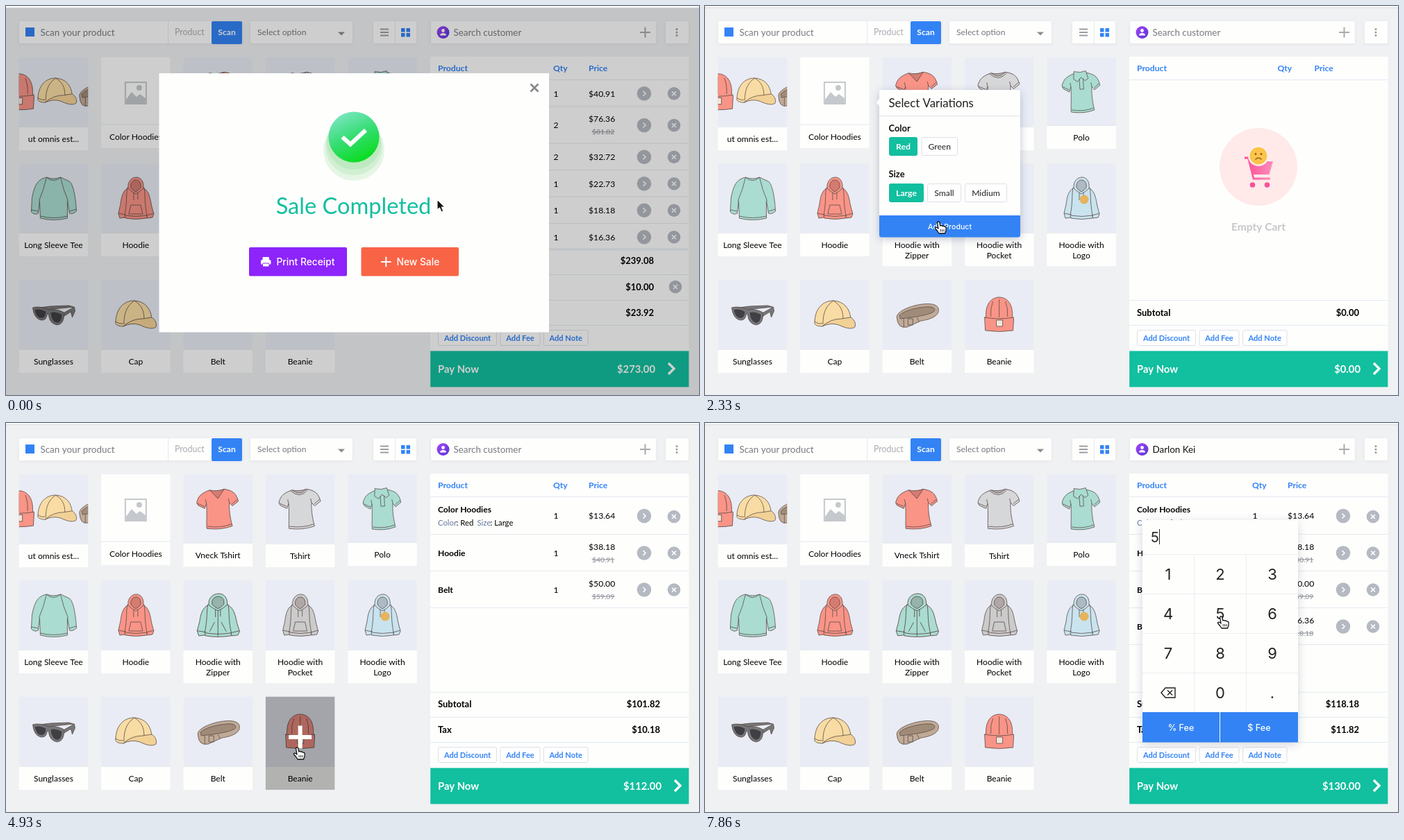
An HTML page with a canvas that plays this animation: 998 px wide and 561 px high, repeating every 8000 ms.

```html
<!DOCTYPE html>
<html lang="en">
<head>
<meta charset="utf-8">
<title>Point of sale</title>
<style>
html, body { margin: 0; width: 100%; height: 100%; overflow: hidden; background: #f0f1f3; }
canvas { display: block; width: 998px; height: 561px; }
</style>
</head>
<body>
<canvas id="stage" width="998" height="561"></canvas>
<script>
const c = document.getElementById('stage').getContext('2d');
const LOOP = 8000;
const BLUE = '#3383f5', GREEN = '#12bf9f', INK = '#5a4c48', LINE = '#e4e8ee', WHITE = '#fefefd';
const CORAL = '#f99487', TEAL = '#aadcd1', GREY = '#d6d7d9', SKY = '#c9e3ef', SHADE = 'rgba(80,40,40,.22)';
const HOST = '3ab8d1c6.zov.test', CUSTOMER = 'Darlon Kei';

// drawing helpers
function box(x, y, w, h, fill, r = 0, stroke) {
  c.beginPath();
  c.roundRect(x, y, w, h, r);
  if (fill) { c.fillStyle = fill; c.fill(); }
  if (stroke) { c.strokeStyle = stroke; c.lineWidth = 1; c.stroke(); }
}
function disc(x, y, r, fill) {
  c.beginPath();
  c.arc(x, y, r, 0, 7);
  c.fillStyle = fill;
  c.fill();
}
function path(d, fill, stroke, width = 1) {
  const p = new Path2D(d);
  if (fill) { c.fillStyle = fill; c.fill(p); }
  if (stroke) { c.strokeStyle = stroke; c.lineWidth = width; c.stroke(p); }
}
function text(s, x, y, size, color = '#000', weight = 400, align = 'left', font = 'Lato') {
  c.font = `${weight} ${size}px ${font}, sans-serif`;
  c.textAlign = align;
  c.fillStyle = color;
  c.fillText(s, x, y + size * .35);
}
function at(x, y, draw, sx = 1, sy = sx, angle = 0) {
  c.save();
  c.translate(x, y);
  c.rotate(angle);
  c.scale(sx, sy);
  draw();
  c.restore();
}
function shadow(blur, color, draw) {
  c.save();
  c.shadowBlur = blur;
  c.shadowColor = color;
  c.shadowOffsetY = blur / 4;
  draw();
  c.restore();
}
const ramp = (t, a, b) => Math.min(1, Math.max(0, (t - a) / (b - a)));
const inside = ([px, py], x, y, w, h) => px >= x && px <= x + w && py >= y && py <= y + h;
const money = v => '$' + v.toFixed(2);
const ink = (d, fill) => path(d, fill, INK, .8);

// product pictures, drawn around their centre
function tee(color, neck) {
  ink('M-10 -28Q0 -25 11 -28L8 -21L1 -15L-7 -21Z', color);
  path('M-10 -28Q0 -25 11 -28L8 -21L1 -15L-7 -21Z', SHADE);
  ink(`M-10 -28C-20 -25 -27 -22 -30 -11L-28 -7L-19 -2L-16 -9C-16 5 -18 18 -18 27Q2 31 19 26
    C16 12 16 0 17 -8L21 -3L30 -9C28 -20 24 -25 11 -28${neck}Z`, color);
  ink('M-16 -9L-17 -15M17 -8L16 -14M-29 -10L-19 -5M21 -6L29 -12M-17 24Q2 28 18 23');
}
const tilted = draw => at(0, 0, draw, 1, 1, -.07);
const vneck = () => tilted(() => tee(CORAL, 'L1 -15L-10 -28'));
const tshirt = () => tilted(() => { tee(GREY, 'Q1 -18 -10 -28'); ink('M-12 -27Q1 -14 13 -27'); });
function polo() {
  at(0, 1, () => {
    tee(TEAL, 'L0 -22');
    ink('M-10 -31L-11 -20L-5 -16L1 -22L7 -17L12 -20L9 -31Q0 -28 -10 -31Z', TEAL);
    ink('M-2 -20V-5H4V-20');
  }, .91, 1, -.06);
}
function longTee() {
  ink(`M-10 -30C-22 -27 -27 -21 -31 0L-32 20Q-27 25 -22 22L-20 4L-19 29Q0 34 20 29L20 4
    L23 22Q27 24 33 19C32 0 29 -19 23 -24L10 -30Q0 -26 -10 -30Z`, TEAL);
  ink('M-10 -30Q-14 -12 -21 4M10 -30Q14 -12 21 4M-32 17L-22 19M23 19L33 16M-19 26Q0 31 20 26M-9 -29Q0 -22 9 -29');
}
function hoodie(color) {
  ink('M-12 -14C-19 -10 -21 0 -22 9L-25 22L-23 29L-15 28L-13 21L-10 2Z', color);
  ink('M12 -14C20 -9 21 2 23 12L26 23L24 28L17 29L14 22L10 2Z', color);
  ink('M-12 -15C-14 -8 -12 4 -16 25L-15 29Q0 32 16 29L16 25C12 4 14 -8 12 -15Q0 -6 -12 -15Z', color);
  ink('M-11 -14C-12 -24 -6 -30 1 -30C8 -30 12 -23 11 -14Q6 -9 0 -6Q-6 -9 -11 -14Z', color);
  ink('M-7 -15C-8 -22 -4 -26 0 -26C5 -26 8 -22 7 -15Q4 -11 0 -9Q-4 -11 -7 -15Z', SHADE);
  ink('M-25 22L-14 24M15 25L26 22M-15 25Q0 28 16 25M-3 -8V3M3 -8V2');
}
const pocket = () => ink('M-10 23L-7 10H7L10 23Z');
const redHoodie = () => { hoodie(CORAL); pocket(); };
const greyHoodie = () => { hoodie('#cccbcb'); pocket(); };
const zipHoodie = () => at(0, 0, () => { hoodie(TEAL); ink('M0 -7V30M-10 23L-4 10M10 23L4 10'); }, 1.2, 1.03);
const badgeHoodie = () => { hoodie(SKY); disc(4, 2, 6.5, '#e5b45c'); };
function glasses() {
  ink('M-29 -9L-4 -12L22 -13L29 -11L-9 -7Z', '#77777a');
  ink('M14 -2L30 -11L31 -5L27 4L25 -4L14 3Z', '#77777a');
  ink('M-30 -10Q-20 -13 -7 -7Q4 -9 15 -3Q16 14 5 15Q-6 13 -7 0L-9 -1Q-10 9 -18 8Q-28 6 -30 -10Z', '#77777a');
  path('M-27 -7Q-18 -9 -11 -4Q-12 6 -18 5Q-25 4 -27 -7ZM-4 -3Q4 -5 12 0Q12 11 5 12Q-3 10 -4 -3Z', '#3f3f44');
}
function cap() {
  ink('M-29 13C-29 -8 -18 -20 -2 -20C14 -19 22 -8 23 6L10 8Q-8 8 -18 17Q-27 17 -29 13Z', '#f9dca4');
  ink('M-18 17Q-6 6 10 6L23 4C28 7 31 13 29 18C24 22 14 19 6 15Q-6 11 -18 17Z', '#f2d196');
  ink('M-2 -20C-14 -12 -17 0 -17 14M-2 -20C8 -14 12 -6 12 6M-29 10Q-24 14 -18 13');
}
function belt() {
  ink('M-29 4C-30 -4 -10 -13 8 -15C24 -17 32 -13 31 -6C31 2 20 7 6 9L-14 18Q-28 21 -29 4Z', '#c0aa96');
  ink('M-25 1C-18 -6 0 -10 12 -11C24 -12 28 -8 24 -4C14 2 -8 4 -24 6Z', '#a08b79');
  ink('M-19 6V18M-13 6H-6V15H-13ZM0 4L3 10');
}
function beanie() {
  ink('M-19 3C-20 -18 -9 -25 0 -25C11 -25 20 -16 19 3L21 5L20 23Q0 26 -20 23L-21 4Z', CORAL);
  ink('M-21 4Q0 8 21 4M-9 -19Q-13 -9 -12 3M0 -22V4M9 -19Q13 -9 12 3');
  ink('M-4 8H5V17H-4Z', '#f1e6dc');
}
function group() {
  at(-50, 0, beanie, 1.05);
  at(5, -1, cap, .95);
  at(62, 2, belt, .85, 1);
}
function noImage() {
  c.strokeStyle = '#c5c8cc';
  c.lineWidth = 2;
  c.strokeRect(-15, -14, 30, 31);
  disc(5, -6, 4, '#c5c8cc');
  path('M-14 11L-6 0L1 7L6 3L14 9V16H-14Z', '#c5c8cc');
}

const products = [
  ['ut omnis est...', group], ['Color Hoodies', noImage], ['Vneck Tshirt', vneck], ['Tshirt', tshirt],
  ['Polo', polo], ['Long Sleeve Tee', longTee], ['Hoodie', redHoodie], ['Hoodie with|Zipper', zipHoodie],
  ['Hoodie with|Pocket', greyHoodie], ['Hoodie with|Logo', badgeHoodie], ['Sunglasses', glasses],
  ['Cap', cap], ['Belt', belt], ['Beanie', beanie]
];
const TILE = 99.5;
const firstLabels = [175, 172, 174, 175, 173];
const tiles = products.map(([name, art], i) => {
  const row = Math.floor(i / 5), col = i % 5, lines = name.split('|');
  const y = [73.7, 226.7, 394.7][row], label = row ? [0, 328, 496][row] : firstLabels[col];
  return { lines, art, label, x: 18.7 + col * 118.4, y, h: label - y + (lines.length > 1 ? 47 : 33) };
});

function drawTile(tile, hover) {
  const { x, y, h, label, lines, art } = tile, mid = x + TILE / 2;
  c.save();
  c.beginPath();
  c.rect(x, y, TILE, 100);
  c.clip();
  box(x, y, TILE, 99, art === noImage ? WHITE : '#e9ecf5');
  at(mid, y + 50.3, art);
  c.restore();
  box(x, label - 1.5, TILE, 1, LINE);
  box(x, label, TILE, y + h - label, WHITE);
  lines.forEach((s, i) => text(s, mid, label + 17 + i * 14.5, 12.05, '#000', 400, 'center'));
  if (hover) {
    box(x, y, TILE, h, 'rgba(0,0,0,.3)');
    box(mid - 16.5, y + 55.3, 33, 6, WHITE);
    box(mid - 3, y + 41.8, 6, 33, WHITE);
  }
}

function drawTop(t) {
  box(0, 0, 998, 2, '#fff');
  box(0, 2, 998, 1, '#d8d9db');
  shadow(4, 'rgba(60,70,100,.08)', () => {
    for (const [x, w] of [[19, 321], [352, 147], [529, 62], [612, 324], [950, 33]]) box(x, 22, w, 32, WHITE, 2);
  });
  box(28, 31, 13, 13, BLUE);
  text('Scan your product', 49.5, 38, 13.4, '#77797e');
  box(233, 22, 1, 32, LINE);
  text('Product', 243, 38, 12.4, '#a9abaf');
  box(296, 22, 44, 33, BLUE, 2);
  text('Scan', 318, 38, 12.1, '#fff', 700, 'center');
  text('Select option', 362, 37.5, 12.2, '#77797e');
  path('M478 37.5H488L483 42.5Z', '#8b8d92');
  box(560, 22, 1, 32, LINE);
  for (const y of [32.5, 37, 41.5]) box(539, y, 12, 2, '#9a9ca1');
  for (const x of [569, 576.5]) for (const y of [32, 39]) box(x, y, 5.5, 5.5, BLUE);

  const g = c.createLinearGradient(622, 30, 638, 46);
  g.addColorStop(0, '#a044f5');
  g.addColorStop(1, '#5a35d8');
  disc(629.5, 38, 9, g);
  disc(629.5, 35.5, 2.4, '#fff');
  path('M625 42.5Q625 39 629.5 39Q634 39 634 42.5Z', '#fff');
  const chosen = t >= 6060;
  text(chosen ? CUSTOMER : 'Search customer', 644.5, 38, 13.4, chosen ? '#111' : '#77797e');
  box(913, 37, 15, 2, '#a9abaf');
  box(919.5, 30.5, 2, 15, '#a9abaf');
  for (const y of [33.5, 38, 42.5]) disc(966, y, 1.5, '#9a9ca1');
}

// cart
const cart = [
  { time: 2400, name: 'Color Hoodies', price: 13.64, meta: true },
  { time: 3330, name: 'Hoodie', price: 38.18, old: 40.91 },
  { time: 4060, name: 'Belt', price: 50, old: 59.09 },
  { time: 5000, name: 'Beanie', price: 16.36, old: 18.18 }
];
const lastCart = [
  { price: 40.91 }, { price: 76.36, old: 81.82, qty: 2 }, { price: 32.72, qty: 2 },
  { price: 22.73 }, { price: 18.18 }, { price: 16.36 }
];

function remove(x, y) {
  disc(x, y, 9.3, '#b5b9c1');
  path(`M${x - 3} ${y - 3}l6 6m0 -6l-6 6`, null, '#fff', 1.6);
}
function drawRow({ name, price, old, meta, qty = 1 }, y, h) {
  const mid = y + h / 2;
  if (name) text(name, 622, meta ? mid - 9 : mid + .3, 12.1, '#000', 700);
  if (meta) {
    text('Color', 622, mid + 10, 11.3, '#68799b');
    text(': Red', 648.5, mid + 10, 11.3);
    text('Size', 678.5, mid + 10, 11.3, '#68799b');
    text(': Large', 697.5, mid + 10, 11.3);
  }
  text(qty, 788.5, mid, 12.2);
  text(money(price), 839, old ? mid - 9 : mid, 12.2);
  if (old) {
    text(money(old), 844, mid + 9.5, 10.3, '#8d9096');
    box(843.5, mid + 9, 33, 1, '#8d9096');
  }
  disc(919, mid, 10.3, '#b5b9c1');
  path(`M917.5 ${mid - 3.5}l3.5 3.5l-3.5 3.5`, null, '#fff', 1.6);
  remove(962, mid + (meta ? 1 : 0));
  box(611, y + h - 1, 372, 1, LINE);
}
function drawTotal(label, value, y, right) {
  box(611, y, 372, 1, '#e1ebf0');
  text(label, 622, y + 18, 13, '#000', 700);
  text(money(value), right, y + 18, 13, '#000', 700, 'right');
}
function drawEmpty() {
  disc(797, 232, 56, '#ffe9e9');
  const g = c.createLinearGradient(777, 0, 818, 0);
  g.addColorStop(0, '#fb4d92');
  g.addColorStop(1, '#fd8fbc');
  path('M777 219H782.5L790 249H814', null, g, 2.8);
  path('M785 224H818L812.5 243H789.5Z', g);
  disc(788.5, 258, 3.8, '#f8519a');
  disc(809.5, 258, 3.8, '#f8519a');
  disc(797, 216, 15, '#fff1ee');
  disc(797, 216, 12.5, '#fdc34b');
  disc(793, 213.5, 1.4, '#8a5a22');
  disc(801, 213.5, 1.4, '#8a5a22');
  path('M792.5 221.5Q797 216.5 801.5 221.5', null, '#8a5a22', 1.3);
  text('Empty Cart', 797, 318.5, 15.5, '#c6c8cb', 700, 'center');
}
function drawCart(t) {
  const before = t < 400;
  const items = before ? lastCart : cart.filter(i => t >= i.time);
  const empty = !items.length;
  box(611, 73, 372.5, 425, WHITE, 2);
  text('Product', 622, 90, 12.2, BLUE, 700);
  text('Qty', empty ? 824.5 : 788, 90, 12.2, BLUE, 700);
  text('Price', empty ? 877.5 : 839, 90, 12.2, BLUE, 700);
  box(611, 106, 372, 1, LINE);
  let y = 107, total = 0;
  for (const item of items) {
    const h = item.meta ? 54 : item.old ? 53 : 38.5;
    drawRow(item, y, h);
    y += h;
    total += item.price;
  }
  if (before) {
    total = 239.08;
    drawTotal('Subtotal', total, 349.5, 933);
    drawTotal('Fee', 10, 387, 933);
    remove(964, 405);
    drawTotal('Tax', 23.92, 424, 933);
    total = 273;
  } else if (empty) {
    drawEmpty();
    drawTotal('Subtotal', 0, 424, 942);
  } else {
    drawTotal('Subtotal', total, 387.8, 942);
    drawTotal('Tax', total / 10, 424, 942);
    total *= 1.1;
  }
  box(611, 460, 372, 1, '#e1ebf0');
  for (const [s, x, w] of [['Add Discount', 622, 84], ['Add Fee', 711.5, 57], ['Add Note', 774, 63.5]]) {
    box(x + .5, 467.5, w, 22, '#fff', 2, '#dde0e6');
    text(s, x + w / 2 + .5, 479, 11.1, BLUE, 700, 'center');
  }
  box(611.2, 497.6, 372.2, 51.8, GREEN);
  const right = before ? 935 : 944;
  text('Pay Now', 622, 523.5, 14.8, '#fff', 700);
  text(money(total), right, 523.5, 14.8, '#fff', 700, 'right');
  path(`M${right + 19} 515l8 8l-8 8`, null, '#fff', 3.4);
}

// overlays
function drawSale() {
  box(0, 3, 998, 558, 'rgba(0,0,0,.19)');
  box(220.5, 97, 561.5, 373.5, WHITE);
  path('M755.5 112.5l11 11m0 -11l-11 11', null, '#85878a', 2.6);
  for (const [y, r] of [[208, 44], [203, 41], [197, 39]]) disc(501, y, r, 'rgba(70,190,80,.13)');
  const g = c.createLinearGradient(480, 153, 515, 226);
  g.addColorStop(0, '#7fe6c6');
  g.addColorStop(.5, '#35dd72');
  g.addColorStop(1, '#06dd17');
  disc(501, 189, 36.5, g);
  path('M484.5 189L496 199.5L518 179', null, '#fff', 6);
  text('Sale Completed', 500.5, 289, 32.6, GREEN, 400, 'center');
  box(350, 348, 141, 41.5, '#8d24fa', 2);
  box(511.5, 348, 140.5, 41.5, '#f96446', 2);
  text('Print Receipt', 389.5, 369, 13.8, '#fff', 500, 'left', 'Inter');
  text('New Sale', 562.5, 369, 13.8, '#fff', 500, 'left', 'Inter');
  box(369.5, 362, 9.5, 5, '#fff', 1);
  box(367, 366, 14.5, 7, '#fff', 2);
  box(369.5, 371, 9.5, 5, '#fff', 1, '#8d24fa');
  box(540, 368, 14.5, 2, '#fff');
  box(546.3, 361.7, 2, 14.5, '#fff');
}

const choices = [
  ['Red', 265, 189, 41, 1400], ['Green', 311.5, 189, 52.5], ['Large', 265, 256, 50, 1860],
  ['Small', 320, 256, 49], ['Midium', 374, 256, 61]
];
function drawVariations(t) {
  c.save();
  c.globalAlpha = ramp(t, 770, 860) * (1 - ramp(t, 3230, 3330));
  shadow(12, 'rgba(40,50,80,.28)', () => box(251, 121, 203, 212, WHITE, 3));
  path('M252 133L246.5 139L252 145Z', WHITE);
  text('Select Variations', 264.5, 140.5, 16.8, '#222');
  box(251, 158, 203, 1, '#e2e4e8');
  text('Color', 264.5, 176, 12.9, '#111', 700);
  text('Size', 264.5, 242.5, 12.9, '#111', 700);
  for (const [s, x, y, w, time] of choices) {
    const on = t >= time && t < 2400;
    box(x + .5, y + .5, w - 1, 26, on ? GREEN : '#fff', 2, on ? GREEN : '#dde0e5');
    text(s, x + w / 2, y + 14, 12.2, on ? '#fff' : '#222', on ? 700 : 400, 'center');
  }
  const ready = t >= 1860 && t < 2400;
  box(251, 302, 203, 31.5, ready ? BLUE : '#77a2ea', [0, 0, 3, 3]);
  text('Add Product', 352.5, 318, 10.6, '#fff', 500, 'center', 'Inter');
  c.restore();
}
function drawCustomers() {
  shadow(8, 'rgba(40,50,80,.15)', () => box(618, 56, 318, 90, WHITE, 2));
  text(CUSTOMER, 632, 82, 13.4, '#222');
}
function drawKeypad(t) {
  shadow(14, 'rgba(40,50,80,.2)', () => box(630, 140, 224, 320, WHITE, 2));
  const typed = t >= 7860;
  if (typed) text('5', 642, 164.5, 20, '#222', 400, 'left', 'Inter');
  box(typed ? 654 : 643, 153, 1, 22, '#222');
  for (let i = 0; i < 4; i++) box(630, 189 + i * 57, 224, 1, '#eceef1');
  for (const x of [704, 779]) box(x, 189, 1, 228, '#eceef1');
  [...'123456789<0.'].forEach((key, i) => {
    const x = 667 + i % 3 * 75, y = 218 + Math.floor(i / 3) * 57;
    if (key !== '<') return text(key, x, y, 22, '#222', 400, 'center', 'Inter');
    path(`M${x - 10} ${y}l6 -7h14v14h-14ZM${x - 1} ${y - 3.5}l7 7m0 -7l-7 7`, null, '#222', 1.4);
  });
  box(630, 417, 111, 43.5, BLUE);
  box(742, 417, 112, 43.5, BLUE);
  text('% Fee', 685.5, 439.5, 12.6, '#fff', 500, 'center', 'Inter');
  text('$ Fee', 798, 439.5, 12.6, '#fff', 500, 'center', 'Inter');
}

// [start, end, text] of each browser status bubble
const statuses = [
  [400, 1000, `Waiting for ${HOST}...`], [5800, 6190, HOST + '/sales#'], [7000, 7330, HOST + '/sales#']
];
function drawStatus(t) {
  for (const [start, end, s] of statuses) {
    const alpha = t < start ? 0 : 1 - ramp(t, end, end + 125);
    if (!alpha) continue;
    c.save();
    c.globalAlpha = alpha;
    box(-2, 541.5, 334.5, 22, '#f8f8f9', 3, '#c3c4c8');
    text(s, 3, 552.5, 12.3, '#5f6165', 400, 'left', 'Inter');
    c.restore();
  }
}

// cursor moves: [start, end, x, y]
const moves = [
  [0, 0, 621, 279], [50, 290, 585, 368], [490, 660, 205, 165], [960, 1260, 285, 203],
  [1560, 1800, 288, 268], [1980, 2200, 336, 310], [2480, 2730, 198, 314], [2960, 3060, 199, 327],
  [3480, 3730, 308, 450], [4280, 4600, 419, 464], [4880, 4930, 419, 467], [5220, 5480, 720, 38],
  [5600, 5800, 792, 85], [6200, 6260, 789, 64], [6330, 7060, 738, 476], [7300, 7660, 743, 278]
];
function pointer(t) {
  let x = 0, y = 0;
  for (const [a, b, mx, my] of moves) {
    if (t < a) break;
    const k = a === b ? 1 : ramp(t, a, b), e = k * k * (3 - 2 * k);
    x += (mx - x) * e;
    y += (my - y) * e;
  }
  return [x, y];
}
function drawPointer([x, y], hand) {
  c.lineJoin = 'round';
  at(x, y, () => {
    if (hand) {
      path(`M-1.5 2Q0 -.5 1.8 2L2.8 7Q4.5 5.5 5.6 7.4Q7.5 6.3 8.4 8.2Q10.8 7.6 11.2 10L11 14L9.5 18
        H1L-1 15L-4.6 10.5Q-4.2 8 -1.4 9.8L0 11Z`, '#fff', '#111', 1.3);
      path('M3.2 12V15.5M5.6 12V15.5M8 12V15.5', null, '#111', .9);
    } else {
      path('M0 0V15L3.5 12L6 18L8.8 16.8L6.3 11H11Z', '#111', '#fff', 1.1);
    }
  });
  c.lineJoin = 'miter';
}

function draw(t) {
  const p = pointer(t);
  const sale = t < 400, variations = t >= 770 && t < 3330, customers = t >= 5560 && t < 6060, keypad = t >= 7130;
  const onPopup = variations && inside(p, 251, 121, 203, 212);
  const hovered = sale || onPopup ? null : tiles.find(a => inside(p, a.x, a.y, TILE, a.h));
  box(0, 0, 998, 561, '#f0f1f3');
  drawTop(t);
  tiles.forEach(tile => drawTile(tile, tile === hovered));
  drawCart(t);
  if (sale) drawSale();
  if (variations) drawVariations(t);
  if (customers) drawCustomers();
  if (keypad) drawKeypad(t);
  drawStatus(t);
  const hand = hovered
    || sale && inside(p, 511, 348, 141, 42)
    || onPopup && (p[1] > 302 || choices.some(([, x, y, w]) => inside(p, x, y, w, 27)))
    || customers && inside(p, 618, 56, 318, 90)
    || inside(p, 622, 467, 216, 23)
    || keypad && inside(p, 630, 189, 224, 271);
  drawPointer(p, hand);
}

function tick() {
  draw(performance.now() % LOOP);
  requestAnimationFrame(tick);
}
tick();
</script>
</body>
</html>
```
